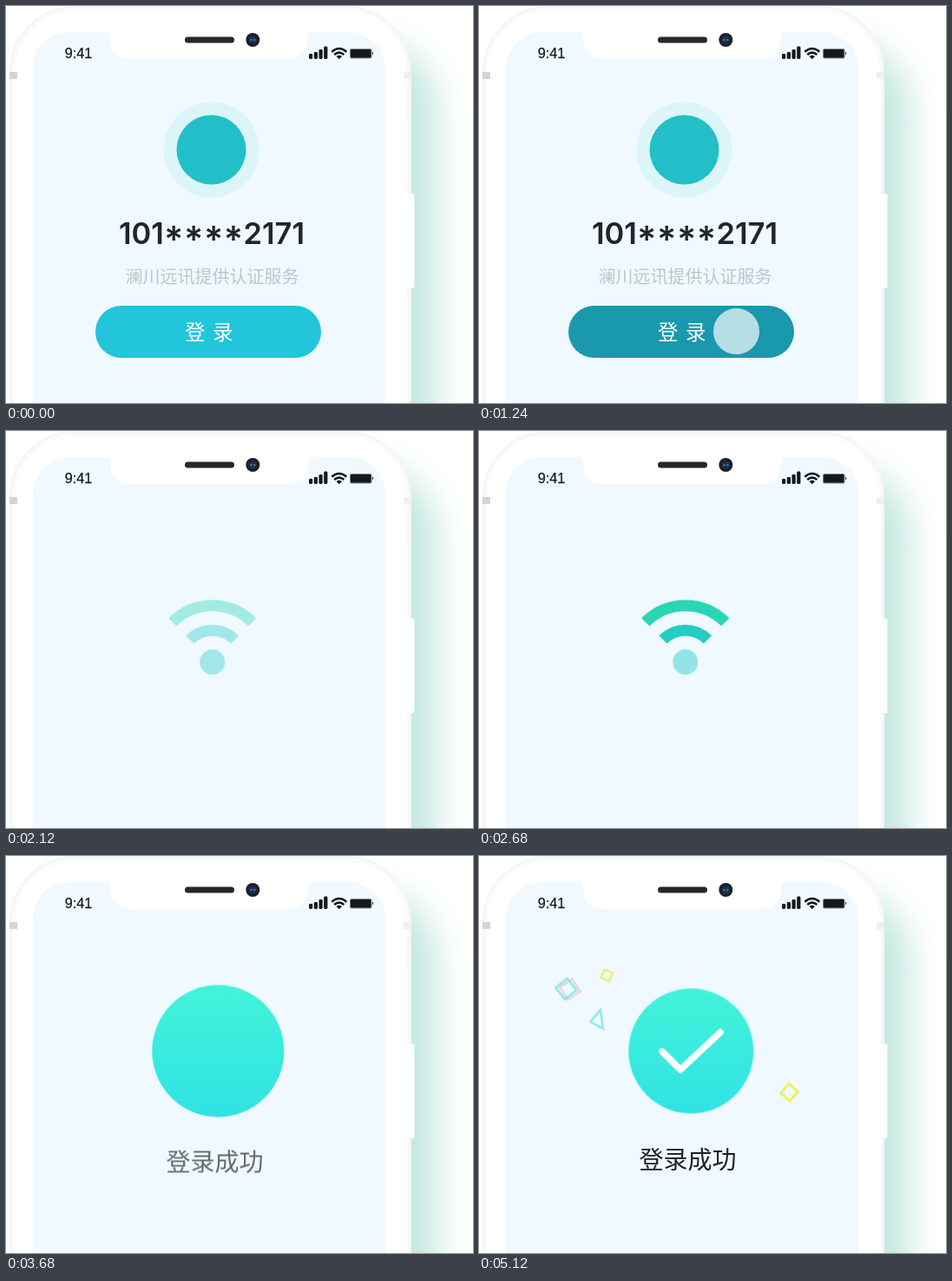
These frames come from a looping animation (538x457 px, 5.16 s). An HTML page:

```html
<!DOCTYPE html>
<html lang="zh">
<head>
<meta charset="utf-8">
<title>Login</title>
<style>
  html, body { margin: 0; width: 100%; height: 100%; overflow: hidden; background: #fff; }
  svg { display: block; width: 538px; height: 457px; }
  .cjk { font-family: "Noto Sans CJK SC", "Noto Sans CJK", "Noto Sans CJK JP", sans-serif; }
  .latin { font-family: "Liberation Sans", sans-serif; }
  .number { font: 600 34.5px Inter, sans-serif; }

  /* every track shares one 5160 ms timeline */
  .card, .button, .touch, .wifi, .wifi *, .disc, .check, .done, .far, .near, .spin {
    animation: 5160ms linear infinite;
  }

  .card { animation-name: leave; }
  @keyframes leave {
    0%, 34% { opacity: 1; transform: translateY(0); }
    34.05% { opacity: .51; transform: translateY(60px); animation-timing-function: ease-out; }
    39.53%, 100% { opacity: 0; transform: translateY(123px); }
  }

  .button { animation-name: press; }
  @keyframes press {
    0%, 19.6%, 28.68%, 100% { fill: #22c5d9; }
    20.93%, 24.03% { fill: #1a98ad; }
  }

  .touch { animation-name: touch; }
  @keyframes touch {
    0%, 11.7%, 28.68%, 100% { opacity: 0; }
    17.05%, 24.03% { opacity: .69; }
  }

  .wifi { animation-name: wifi; }
  @keyframes wifi {
    0%, 37.2% { opacity: 0; }
    47.29%, 61% { opacity: 1; }
    64.4%, 100% { opacity: 0; }
  }
  .wifi .dot { animation-name: blink-dot; }
  .wifi .inner { animation-name: blink-inner; }
  .wifi .outer { animation-name: blink-outer; }
  @keyframes blink-dot { 0%, 49.8%, 54%, 100% { opacity: 1; } 51.94% { opacity: .45; } }
  @keyframes blink-inner { 0%, 53%, 57%, 100% { opacity: 1; } 55% { opacity: .45; } }
  @keyframes blink-outer { 0%, 56%, 59.69%, 100% { opacity: 1; } 57.8% { opacity: .45; } }

  .disc { animation-name: pop; }
  @keyframes pop {
    0%, 65.1% { transform: scale(0); animation-timing-function: ease-out; }
    70.54% { transform: scale(1.08); }
    71.32% { transform: scale(1.056); animation-timing-function: ease-in-out; }
    76.74% { transform: scale(.96); animation-timing-function: ease-in-out; }
    85.27% { transform: scale(.986); animation-timing-function: ease-out; }
    93%, 100% { transform: scale(1); }
  }

  .check { stroke-dasharray: 1 2; animation-name: draw; }
  @keyframes draw {
    0%, 74.4% { stroke-dashoffset: 1; opacity: 0; }
    74.42% { stroke-dashoffset: 1; opacity: 1; animation-timing-function: ease-in-out; }
    81.4%, 100% { stroke-dashoffset: 0; opacity: 1; }
  }

  .done { animation-name: rise; animation-timing-function: ease-out; }
  @keyframes rise {
    0%, 66.28% { opacity: 0; transform: translateY(32px); }
    71.32% { opacity: .66; transform: translateY(2.5px); }
    74.4%, 100% { opacity: 1; transform: translateY(0); }
  }

  .far { animation-name: fly-far; }
  .near { animation-name: fly-near; }
  @keyframes fly-far {
    0%, 75.19% { opacity: 0; transform: translate(0, 0); animation-timing-function: cubic-bezier(.33, .67, .67, 1); }
    86.8%, 100% { opacity: 1; transform: translate(var(--x), var(--y)); }
  }
  @keyframes fly-near {
    0%, 75.19% { opacity: 0; transform: translate(0, 0); animation-timing-function: cubic-bezier(.33, 1, .68, 1); }
    95%, 100% { opacity: 1; transform: translate(var(--x), var(--y)); }
  }
  .spin { animation-name: spin; }
  @keyframes spin {
    0%, 75.19% { transform: rotate(var(--from)); }
    100% { transform: rotate(var(--to)); }
  }
</style>
</head>
<body>
<svg viewBox="0 0 538 457">
  <defs>
    <linearGradient id="mint" x1="0" y1="0" x2="0" y2="1">
      <stop offset="0" stop-color="#43f3da"/>
      <stop offset="1" stop-color="#30e3e4"/>
    </linearGradient>
    <linearGradient id="band">
      <stop offset="0" stop-color="#d4d4d4"/>
      <stop offset="1" stop-color="#f0f0f0"/>
    </linearGradient>
    <filter id="soft" x="-20%" y="-20%" width="140%" height="140%">
      <feGaussianBlur stdDeviation="20"/>
    </filter>
    <clipPath id="screen"><rect x="31" y="30" width="406" height="520" rx="42"/></clipPath>
  </defs>

  <!-- phone -->
  <rect x="60" y="44" width="434" height="560" rx="70" fill="#46b89c" opacity=".34" filter="url(#soft)"/>
  <rect x="460" y="216" width="10.5" height="109" rx="2" fill="#fff"/>
  <rect x="5.5" y="1.5" width="460" height="600" rx="74" fill="#fff" stroke="#f6f6f6" stroke-width="3"/>
  <rect x="8.5" y="4.5" width="454" height="594" rx="71" fill="none" stroke="#fbfbfb" stroke-width="3"/>
  <path d="M4 76h9v8h-9zM458 76h9v8h-9z" fill="url(#band)"/>
  <rect x="460" y="217" width="9.5" height="107" rx="2" fill="#fff"/>
  <rect x="31" y="30" width="406" height="520" rx="42" fill="#eff9ff"/>

  <g clip-path="url(#screen)">
    <g class="card">
      <circle cx="236.5" cy="165.5" r="55" fill="#dcf5f8"/>
      <circle cx="236.5" cy="165.5" r="40" fill="#22bfc8"/>
      <text class="number" x="237" y="274" text-anchor="middle" fill="#222529">101****2171</text>
      <text class="cjk" x="137.5" y="318.5" font-size="20" fill="#bfc4c8">澜川远讯提供认证服务</text>
      <rect class="button" x="103" y="345" width="260" height="60" rx="30" fill="#22c5d9"/>
      <text class="cjk" x="206 238" y="384" font-size="23.5" fill="#fff">登录</text>
      <circle class="touch" cx="296.5" cy="374.5" r="26.5" fill="#fff"/>
    </g>

    <g transform="translate(237.7 266)">
      <g class="wifi" fill="none" stroke-width="13">
        <path class="outer" d="M-46 -46A65 65 0 0 1 46 -46" stroke="#28d6b5"/>
        <path class="inner" d="M-25.8 -25.8A36.5 36.5 0 0 1 25.8 -25.8" stroke="#25ccc1"/>
        <circle class="dot" r="14.5" fill="#24c8cc"/>
      </g>
    </g>

    <g transform="translate(244.3 224.5)">
      <g fill="none" stroke-width="2.3">
        <g class="far" style="--x:-139.5px; --y:-71px">
          <rect class="spin" style="--from:-27deg; --to:-33deg" x="-8.5" y="-8.5" width="17" height="17" stroke="#f5cad8"/>
        </g>
        <g class="far" style="--x:-144px; --y:-71.5px">
          <rect class="spin" style="--from:-21deg; --to:-38.5deg" x="-8.5" y="-8.5" width="17" height="17" stroke="#7de9ec"/>
        </g>
        <g class="near" style="--x:-97px; --y:-87px">
          <rect class="spin" style="--from:-18deg; --to:26.5deg" x="-5.2" y="-5.2" width="10.4" height="10.4" stroke="#eeef66"/>
        </g>
        <g class="near" style="--x:-107px; --y:-35.5px">
          <path class="spin" style="--from:-18deg; --to:26.5deg" d="M-2.7 -12L-7.2 5.5L9.3 6.5Z" stroke="#7de9ec"/>
        </g>
        <g class="far" style="--x:113.2px; --y:47.5px">
          <rect class="spin" style="--from:-41deg; --to:42.6deg" x="-7" y="-7" width="14" height="14" stroke="#eeef58" stroke-width="2.8"/>
        </g>
      </g>
      <circle class="disc" r="72" fill="url(#mint)"/>
      <path class="check" pathLength="1" d="M-33.3 .5L-12.3 21.5L33.7 -21.5" fill="none" stroke="#fff" stroke-width="7.5" stroke-linecap="round" stroke-linejoin="round"/>
    </g>
    <text class="cjk done" x="184.5" y="359.5" font-size="28" fill="#1d2024">登录成功</text>
  </g>

  <!-- notch and status bar -->
  <path d="M112 29H356Q348 29 348 37Q348 61 324 61H144Q120 61 120 37Q120 29 112 29Z" fill="#fff"/>
  <rect x="206" y="35.5" width="57" height="7" rx="3.5" fill="#28282b"/>
  <circle cx="284.3" cy="39" r="8" fill="#1d2026"/>
  <circle cx="284.3" cy="39" r="4.5" fill="#18324f"/>
  <circle cx="282.5" cy="39" r="1.2" fill="#3f75a5"/>
  <circle cx="286.3" cy="39" r="1.2" fill="#3f75a5"/>
  <text class="latin" x="67.7" y="60" font-size="16.2" fill="#15181c" stroke="#15181c" stroke-width=".25">9:41</text>
  <g fill="#15181c">
    <rect x="349" y="55" width="4.2" height="6" rx="1.4"/>
    <rect x="354.8" y="53" width="4.2" height="8" rx="1.4"/>
    <rect x="360.5" y="50" width="4.2" height="11" rx="1.4"/>
    <rect x="366.2" y="46.5" width="4.2" height="14.5" rx="1.4"/>
    <path d="M383.8 61.2L380.6 58Q383.8 55.6 387 58Z"/>
    <rect x="396.5" y="49.5" width="24.5" height="10.5" rx="1.5" stroke="#84888c"/>
    <path d="M422.2 52.5q2 2 0 4z"/>
  </g>
  <path d="M375.3 52.7Q383.8 45.3 392.3 52.7M378.2 56Q383.8 51.3 389.4 56" fill="none" stroke="#15181c" stroke-width="2.5"/>
</svg>
</body>
</html>
```
